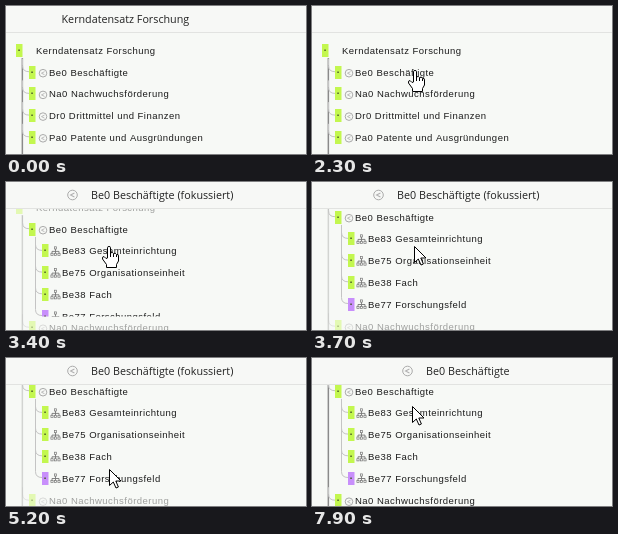
These frames come from a looping animation (300x148 px, 8000 ms). An HTML page with a canvas:

```html
<!DOCTYPE html>
<html lang="de">
<head>
<meta charset="utf-8">
<title>Kerndatensatz Forschung</title>
<style>
html, body { margin: 0; width: 100%; height: 100%; overflow: hidden; background: #f7f9f6; }
canvas { display: block; width: 300px; height: 148px; }
</style>
</head>
<body>
<canvas id="stage"></canvas>
<script>
const LOOP = 8000, STEP = 100, PITCH = 21.7;
const GREEN = '#c3f74f', PURPLE = '#c88ffb', INK = '#1c1c1c';
const TREE_FONT = '9.5px "Liberation Sans", Arial, sans-serif';
const uiFont = size => `${size}px "Open Sans", sans-serif`;

const areas = ['Be0 Beschäftigte', 'Na0 Nachwuchsförderung', 'Dr0 Drittmittel und Finanzen', 'Pa0 Patente und Ausgründungen'];
const children = ['Be83 Gesamteinrichtung', 'Be75 Organisationseinheit', 'Be38 Fach', 'Be77 Forschungsfeld'];

// Pointer hot spot: time, x, y
const pointerPath = [
  [900, 102, -8], [1700, 104, 48], [2300, 102, 64], [4000, 102, 64], [4900, 103, 108], [5200, 103, 111],
  [5800, 101, 56], [6200, 100, 35], [6300, 100, 35], [6400, 101, 35], [7600, 101, 35], [7900, 100, 48]
];
const arrowShape = new Path2D('M.5 .5V16.5L4.3 13L7 19L9.4 18L6.8 12H12Z');
const handShape = new Path2D('M-.5 12V1.5Q-.5 .5 1 .5T2.5 1.5V7Q4.5 5.5 5.5 7.5Q7.5 6.5 8.5 8.5Q10.5 7.5 10.5 10V15L8.5 18.5V21.5H-1.5V18.5L-5.5 13Q-6 10.5-4 10.5L-2 12.5Z');
const fingerLines = new Path2D('M2.5 7V11M5.5 8V11M8.5 9V11');

const canvas = document.getElementById('stage');
const ctx = canvas.getContext('2d');
const scale = window.devicePixelRatio || 1;
canvas.width = 300 * scale;
canvas.height = 148 * scale;

const progress = (t, from, to) => Math.min(1, Math.max(0, (t - from) / (to - from)));
const easeOut = p => 1 - (1 - p) ** 3;

function rect(x, y, w, h, color) {
  ctx.fillStyle = color;
  ctx.fillRect(x, y, w, h);
}

function line(d, color, width = 1) {
  ctx.strokeStyle = color;
  ctx.lineWidth = width;
  ctx.stroke(new Path2D(d));
}

function text(label, x, y, font, color, spacing = 0) {
  ctx.font = font;
  ctx.letterSpacing = spacing + 'px';
  ctx.fillStyle = color;
  ctx.fillText(label, x, y);
}

function circleIcon(x, y, r) {
  ctx.beginPath();
  ctx.arc(x, y, r, 0, 7);
  ctx.strokeStyle = '#a2a2a2';
  ctx.lineWidth = 0.9;
  ctx.stroke();
  const w = r * 0.4;
  line(`M${x + w} ${y - w}L${x - w} ${y}L${x + w} ${y + w}`, '#b0b0b0', r * 0.22);
}

function sitemapIcon(x, y, color, bold) {
  const size = bold ? 3 : 2.2;
  line(`M${x} ${y - 3}V${y + 3}M${x - 3.5} ${y + 3}V${y}H${x + 3.5}V${y + 3}`, color, 0.9);
  for (const [dx, dy] of [[0, -3.5], [-3.5, 3], [0, 3], [3.5, 3]]) {
    rect(x + dx - size / 2, y + dy - size / 2, size, size, bold ? color : '#f7f9f6');
    ctx.strokeStyle = color;
    ctx.lineWidth = 0.7;
    ctx.strokeRect(x + dx - size / 2, y + dy - size / 2, size, size);
  }
}

function row(label, y, depth, { color = GREEN, alpha = 1, icon = 'circle', branch = '#c4c4c4' } = {}) {
  const x = 10 + 13 * depth, top = Math.round(y - 7);
  ctx.save();
  ctx.globalAlpha = alpha;
  if (depth) line(`M${x - 6.5} ${y - 14}V${y - 7}Q${x - 6.5} ${y - 1} ${x} ${y - 1}`, branch);
  rect(x, top, 6.5, 13, color);
  rect(x + 2.3, top + 5.5, 1.5, 1.5, '#4a5a2a');
  if (icon === 'circle') circleIcon(x + 14, y + 0.5, 3.8);
  if (icon === 'sitemap') sitemapIcon(x + 13.5, y, '#777');
  if (icon === 'bold') sitemapIcon(x + 13, y, '#000', true);
  text(label, x + 20, Math.round(y) + 3, TREE_FONT, INK, 0.47);
  ctx.restore();
}

function tree(t) {
  const scroll = Math.round(-33 * easeOut(progress(t, 3200, 4000)));
  const open = easeOut(progress(t, 3200, 3600)) * (children.length * PITCH + 1);
  const focused = t >= 3200 && t < 6900;
  const alpha = focused ? 0.4 : 1;
  const pressed = t === 3200;
  const rootY = 45 + scroll, firstY = rootY + PITCH;
  const rowYs = [rootY];

  rect(15.6, rootY + 7, 1.5, 148, focused ? '#d2d4d1' : '#8a8a8a');
  row('Kerndatensatz Forschung', rootY, 0, { alpha, icon: '' });

  areas.forEach((label, i) => {
    const y = firstY + i * PITCH + (i ? open : 0);
    rowYs.push(y);
    row(label, y, 1, i ? { alpha } : pressed ? { icon: 'bold', branch: '#222' } : {});
  });

  if (open) {
    ctx.save();
    ctx.beginPath();
    ctx.rect(0, firstY + 7, 300, open + 3);
    ctx.clip();
    line(`M29.5 ${firstY + 7}V${firstY + 4 * PITCH - 8}`, '#c4c4c4');
    children.forEach((label, i) => {
      const y = firstY + (i + 1) * PITCH;
      rowYs.push(y);
      row(label, y, 2, { icon: 'sitemap', color: i === 3 ? PURPLE : GREEN });
    });
    ctx.restore();
  }
  return rowYs;
}

function header(t) {
  rect(0, 0, 300, 26, '#f7f8f6');
  rect(0, 26, 300, 1, '#e2e3e1');
  const title = (label, x, icon) => {
    if (icon) circleIcon(x - 18.5, 13, 4.8);
    text(label, x, 17, uiFont(10.75), '#222');
  };
  if (t < 2000) title('Kerndatensatz Forschung', 55.5);
  else if (t >= 6900) title('Be0 Beschäftigte', 114, true);
  else if (t >= 3200) title('Be0 Beschäftigte (fokussiert)', 85, true);
}

function tooltip(t) {
  if (t < 2800 || t > 3200) return;
  ctx.save();
  ctx.globalAlpha = progress(t, 2700, 3000);
  rect(106, 93, 148, 19, 'rgba(0,0,0,.2)');
  rect(105, 92, 148, 19, 'rgba(0,0,0,.25)');
  rect(102, 89, 149, 20, '#777');
  rect(103, 90, 147, 18, '#fff');
  text('Be0 Beschäftigte [Bereich]', 108, 103, uiFont(11.2), '#5f5f66');
  ctx.restore();
}

function pointer(t, rowYs) {
  if (t < pointerPath[0][0]) return;
  const next = pointerPath.findIndex(key => key[0] >= t);
  const b = pointerPath[next], a = pointerPath[Math.max(0, next - 1)];
  const p = progress(t, a[0], b[0] + (a === b));
  const x = Math.round(a[1] + (b[1] - a[1]) * p);
  const y = Math.round(a[2] + (b[2] - a[2]) * p);
  const overRow = y > 27 && rowYs.some(rowY => Math.abs(rowY - y) < 6.2);
  const shape = overRow ? handShape : arrowShape;
  ctx.save();
  ctx.translate(x, y);
  ctx.fillStyle = '#fff';
  ctx.strokeStyle = '#000';
  ctx.lineWidth = 1;
  ctx.fill(shape);
  ctx.stroke(shape);
  if (overRow) ctx.stroke(fingerLines);
  ctx.restore();
}

function draw(now) {
  const t = Math.floor(now % LOOP / STEP) * STEP;
  ctx.setTransform(scale, 0, 0, scale, 0, 0);
  rect(0, 0, 300, 148, '#f7f9f6');
  const rowYs = tree(t);
  header(t);
  tooltip(t);
  pointer(t, rowYs);
}

const start = performance.now();
function tick() {
  draw(Math.max(0, performance.now() - start));
  requestAnimationFrame(tick);
}
tick();
</script>
</body>
</html>
```
